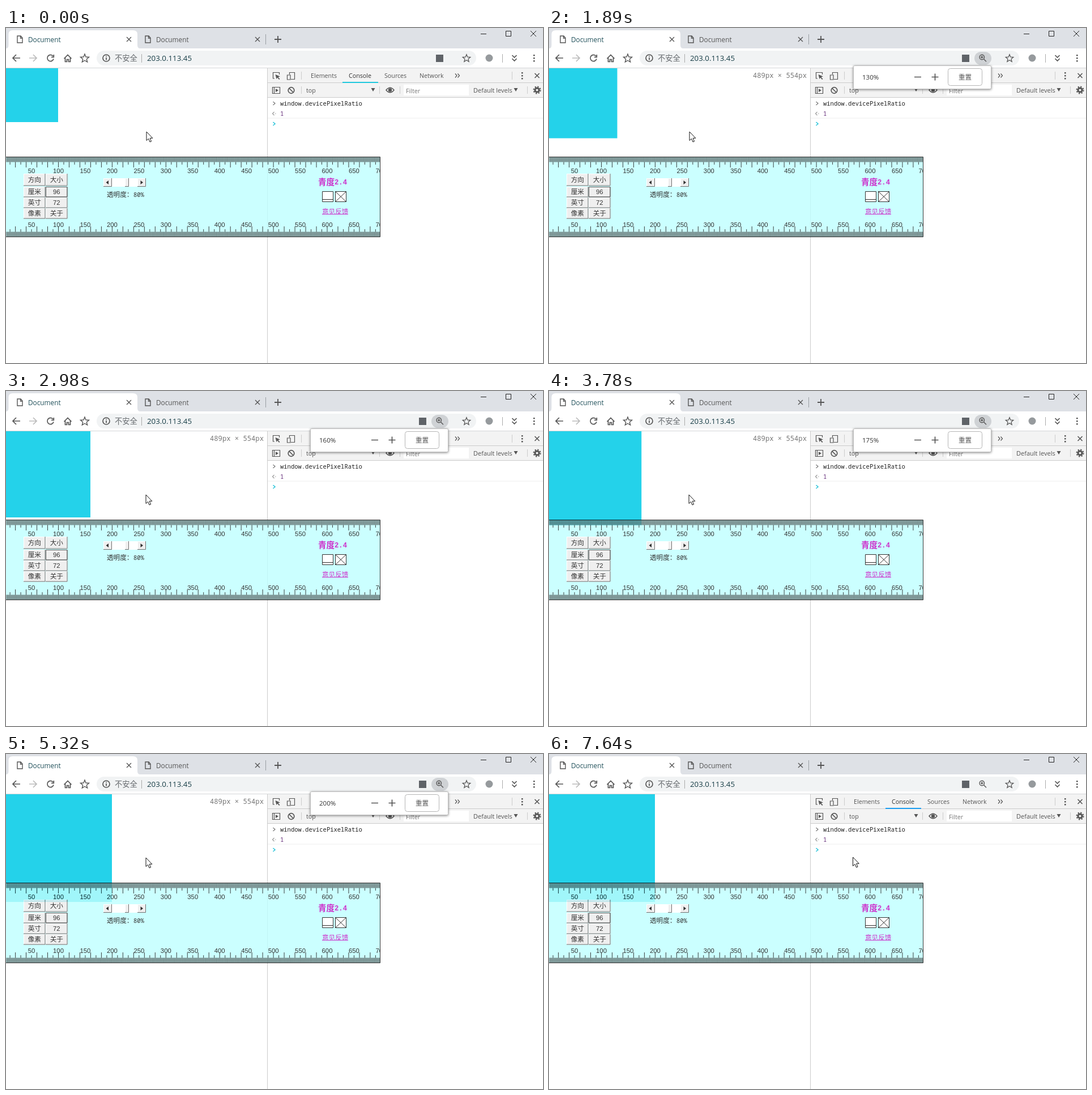
Recreate the animation shown at these times as an HTML page. Size 948 by 591 pixels, loop 8000 ms.

```html
<!DOCTYPE html>
<html lang="zh-CN">
<head>
<meta charset="utf-8">
<title>Zoom and ruler</title>
<style>
html, body { margin: 0; width: 100%; height: 100%; overflow: hidden; background: #fff; }
svg { display: block; }
text { font: 10.7px "Open Sans", "Noto Sans CJK SC", sans-serif; fill: #555; white-space: pre; }
.tab { font-size: 11.8px; }
.cjk { font: 11.6px "Noto Sans CJK SC", "Noto Sans CJK", sans-serif; fill: #000; }
.num { font: 11.3px "Liberation Sans", sans-serif; fill: #000; }
.code { font: 10.5px "Noto Sans Mono", monospace; fill: #222; }
.mid { text-anchor: middle; }
.line { fill: none; stroke: #555; stroke-width: 1.4; }
.bar { stroke: #ccc; fill: none; }
#popup, #zoomBg { transform-box: fill-box; transform-origin: center; }
#popup > rect:first-child { filter: drop-shadow(0 1px 2px #0007); }
</style>
</head>
<body>
<svg width="948" height="591" viewBox="0 0 948 591">
  <!-- tab strip -->
  <path fill="#dee1e6" d="M0 0H948V36H0Z"/>
  <path fill="#fff" d="M0 36Q4.500 36 4.500 30V11Q4.500 4 12 4H224Q232 4 232 11V30Q232 36 237 36V70H0Z"/>
  <path fill="#fff" d="M0 36H948V70H0Z"/>
  <g class="line" stroke-width="1.2">
    <path id="page" d="M20 14H26L29 17.500V26H20ZM25.500 14V18H29"/>
    <use href="#page" x="226"/>
    <path id="tabX" d="M213 16L221 24M221 16L213 24"/>
    <use href="#tabX" x="227"/>
    <path d="M474 20H486M480 14V26" stroke-width="1.8"/>
  </g>
  <path stroke="#999da3" d="M458.500 11V29"/>
  <text class="tab" x="39" y="24.500" style="fill:#20505a">Document</text>
  <text class="tab" x="265" y="24.500">Document</text>
  <path fill="none" stroke="#222" d="M838 10.500H848M882.500 5.500H891.500V14.500H882.500ZM926 5L936 15M936 5L926 15"/>

  <!-- address bar -->
  <rect x="160" y="40" width="670" height="26" rx="13" fill="#f1f3f4"/>
  <g class="line" style="stroke-width:1.7">
    <path d="M25 53H12M18 47L12 53L18 59"/>
    <path stroke="#bbb" d="M41 53H54M48 47L54 53L48 59"/>
    <path d="M83 49.500A5.600 5.600 0 1 0 84 54.500M84.300 47V51.300H80"/>
    <path d="M102.500 54L109 47.500L115.500 54M104.500 52.500V59.500H107.500V55.500H110.500V59.500H113.500V52.500"/>
    <path id="star" style="stroke-width:1.4" d="M139 46L141 51L146.500 51.400L142.300 55L143.600 60L139 57.200L134.400 60L135.700 55L131.500 51.400L137 51Z"/>
    <use href="#star" transform="translate(687.900 5.300) scale(.9)"/>
    <circle cx="177" cy="53" r="6"/>
    <path d="M177 52V56.500M177 49V50.500"/>
    <path d="M893.500 48L897.500 52L901.500 48M893.500 54L897.500 58L901.500 54"/>
  </g>
  <text class="cjk" x="192" y="58" style="font-size:13.300px;fill:#666a6e">不安全</text>
  <path stroke="#aaa" d="M239.500 46V61M876.500 46V61"/>
  <text x="249" y="57.500" style="font-size:13.300px;fill:#173d46">203.0.113.45</text>
  <rect id="translate" y="47" width="13" height="13" fill="#5f6368"/>
  <g id="zoomIcon">
    <rect id="zoomBg" x="751" y="42" width="30" height="23" rx="11.500" fill="#cfd2d5"/>
    <path class="line" d="M768.500 51.500A4.200 4.200 0 1 1 760.100 51.500A4.200 4.200 0 1 1 768.500 51.500M767.500 54.700L772 59.200M762 51.500H766.600M764.300 49.200V53.800"/>
  </g>
  <circle cx="853" cy="53" r="6.500" fill="#969a9d"/>
  <path id="dots" fill="#555" d="M931 47h2.500v2.500h-2.500zM931 52h2.500v2.500h-2.500zM931 57h2.500v2.500h-2.500z"/>
  <path stroke="#d4d6d8" d="M0 70.500H948"/>

  <!-- page -->
  <rect id="box" y="71" fill="#24d2ea"/>
  <text id="size" class="code" x="360" y="88" style="font-size:12.180px;fill:#777">489px × 554px</text>

  <!-- developer tools -->
  <path fill="#fff" d="M461 71H948V591H461Z"/>
  <path fill="#f3f3f3" d="M462 71H948V122H462Z"/>
  <path class="bar" d="M461.500 71V591M462 96.500H948M462 122.500H948M521.500 77V91M893.500 77V91M521.500 103V116M659.500 103V116M695.500 103V116M920.500 103V116"/>
  <path stroke="#eee" d="M462 159H948"/>
  <use href="#dots" x="-21" y="31"/>
  <g class="line" style="stroke-width:1.200">
    <path d="M474 89H471.500V78.500H482.500V82"/>
    <path fill="#555" d="M475.500 82L484 85.500L480.500 86.500L483.500 90L482 91L479.300 87.500L477.500 90Z" stroke="none"/>
    <path d="M500.500 82V78.500H509.500V90.500H503M496.500 83H502V91H496.500Z"/>
    <path d="M933.500 80L941.500 88M941.500 80L933.500 88" style="stroke-width:1.600"/>
    <path d="M470.500 104.500H483.500V115.500H470.500ZM473.500 105V115"/>
    <path fill="#555" stroke="none" d="M476 107L481 110L476 113Z"/>
    <circle cx="503.500" cy="110" r="5.300" style="stroke-width:1.700"/>
    <path d="M500 106.500L507 113.500" style="stroke-width:1.700"/>
    <path d="M671 109.500Q678 101 685 109.500Q678 118 671 109.500Z" style="stroke-width:1.500"/>
    <circle cx="678" cy="109.500" r="2.600" fill="#555"/>
    <circle cx="937.500" cy="109.500" r="3.600" style="stroke-width:3"/>
    <circle cx="937.500" cy="109.500" r="6" style="stroke-width:2;stroke-dasharray:2.350"/>
    <path d="M793 80.500L796 84L793 87.500M797.500 80.500L800.500 84L797.500 87.500"/>
    <path d="M471.500 130L475 133L471.500 136" stroke="#777"/>
    <path d="M473.500 148L470.500 151L473.500 154M475 151H476.500" stroke="#999"/>
    <path d="M471.500 166L475 169L471.500 172" stroke="#27c3da" style="stroke-width:1.500"/>
  </g>
  <text x="538" y="88">Elements</text>
  <text x="605" y="88" style="fill:#333">Console</text>
  <text x="668" y="88">Sources</text>
  <text x="730" y="88">Network</text>
  <path id="underline" d="M594 96H657" stroke-width="2"/>
  <text x="530" y="114">top</text>
  <path fill="#555" d="M644.500 106H651.500L648 112ZM896.500 106H903.500L900 112Z"/>
  <rect x="702" y="100" width="115" height="19" fill="#fff"/>
  <text x="706" y="114.500" style="fill:#777">Filter</text>
  <text x="825" y="113.500" style="font-size:11px">Default levels</text>
  <text class="code" x="484" y="136.500">window.devicePixelRatio</text>
  <text class="code" x="484" y="155" style="fill:#67307c">1</text>
  <path id="caret" stroke="#333" d="M484.500 162V176"/>

  <!-- zoom bubble -->
  <g id="popup">
    <rect x="537.500" y="66.500" width="243" height="41" rx="2" fill="#fff" stroke="#bbb"/>
    <text id="percent" x="553" y="91" style="font-size:11.500px;fill:#333"></text>
    <path class="line" d="M645 86.500H657M675.500 86.500H687.500M681.500 80.500V92.500" style="stroke-width:1.700"/>
    <rect x="704.500" y="71.500" width="60" height="30" rx="4" fill="#fff" stroke="#b5b5b5"/>
    <text class="cjk mid" x="734.500" y="91" style="fill:#555">重置</text>
  </g>

  <!-- translucent ruler window -->
  <svg y="227" width="661" height="142" viewBox="0 227 661 142" opacity=".8">
    <path fill="#bfffff" d="M0 227H661V369H0Z"/>
    <path id="ticks" stroke="#000" stroke-width=".95"/>
    <path stroke="#000" fill="none" d="M0 227.500H660.500V368.500H0"/>
    <path fill="#fff" d="M187 265H232V280H187Z"/>
    <g id="ruler"></g>
    <path fill="#000" d="M181 269V276L176.500 272.500ZM237.500 269V276L242 272.500Z"/>
    <text class="cjk" x="178" y="298">透明度：</text>
    <text class="code" x="225" y="298" style="fill:#000">80%</text>
    <text class="cjk" x="551" y="276.500" style="font-size:14.600px;font-weight:bold;fill:#c000c0">青度</text>
    <text x="580" y="276" style="font:bold 12.200px 'Liberation Mono',monospace;fill:#c000c0">2.4</text>
    <path fill="#fff" stroke="#000" d="M558.500 288.500H577.500V306.500H558.500ZM558.500 302.500H577.500M581.500 288.500H600.500V306.500H581.500ZL600.500 306.500M600.500 288.500L581.500 306.500"/>
    <text class="cjk" x="558" y="327.500" style="fill:#c000c0">意见反馈</text>
    <path stroke="#c000c0" d="M558 328.500H604"/>
  </svg>

  <path id="cursor" fill="#fff" stroke="#111" d="M0 0V15.500L3.600 12.300L6 18L8.500 17L6.200 11.300H10.800Z"/>
</svg>
<script>
const $ = id => document.getElementById(id);
const LOOP = 8000;

// [start ms, values...]
const zooms = [[0, 100], [1400, 115], [1570, 120], [1720, 125], [1890, 130], [2050, 135],
  [2210, 145], [2810, 150], [2980, 160], [3270, 165], [3420, 170], [3780, 175],
  [4220, 180], [4370, 185], [5010, 190], [5320, 200]];
const moves = [[0, 248, 183], [2980, 247, 183], [6580, 509, 181], [6730, 522, 181],
  [6880, 536.5, 181], [7490, 536.5, 182]];
const bubble = [[0, 0, 1], [1400, .5, .967], [1570, 1, 1], [6880, .6, .985], [7350, 0, 1]];
const at = (list, t) => list.findLast(step => step[0] <= t).slice(1);

function buildRuler() {
  let ticks = '', parts = '';
  for (let u = 4; u <= 700; u += 2) {
    const x = (u * .949 - 2.4).toFixed(2);
    const len = u % 20 == 0 ? 18 : u % 10 == 0 ? 13 : 8.5;
    ticks += `M${x} 228v${len}M${x} 368v${-len}`;
    if (u % 50 == 0) for (const y of [256, 351])
      parts += `<text class="num mid" x="${x}" y="${y}">${u}</text>`;
  }
  const button = (x, y, w, h, label = '', focus) => {
    const r = x + w, b = y + h;
    parts += `<path fill="#ececec" d="M${x} ${y}h${w}v${h}h${-w}z"/>
      <path fill="none" stroke="#fff" d="M${x + .5} ${b}V${y + .5}H${r}"/>
      <path fill="none" stroke="#4c4c4c" d="M${x} ${b - .5}H${r - .5}V${y}"/>
      ${focus ? `<path fill="none" stroke="#333" d="M${x + .5} ${y + .5}h${w - 1}v${h - 1}h${1 - w}z"/>` : ''}
      <text class="${label > 0 ? 'num' : 'cjk'} mid" x="${x + w / 2}" y="${y + h / 2 + 4.2}">${label}</text>`;
  };
  const rows = [['方向', '大小'], ['厘米', '96'], ['英寸', '72'], ['像素', '关于']];
  rows.forEach((row, i) => row.forEach((label, j) =>
    button(31 + j * 39, i ? 261 + i * 19 : 257, 38.5, i ? 18.5 : 21.5, label, label == '96')));
  button(172, 265, 15, 15);
  button(210, 265, 7, 15);
  button(232, 265, 15, 15);
  $('ticks').setAttribute('d', ticks);
  $('ruler').innerHTML = parts;
}

const show = (id, on) => $(id).setAttribute('visibility', on ? 'visible' : 'hidden');

function draw(now) {
  const t = now % LOOP;
  const [zoom] = at(zooms, t), [x, y] = at(moves, t), [alpha, scale] = at(bubble, t);
  const zoomed = t >= 1400, opening = zoomed && t < 1570;
  $('box').setAttribute('width', .95 * zoom - 3);
  $('box').setAttribute('height', .95 * zoom);
  $('percent').textContent = zoom + '%';
  $('cursor').setAttribute('transform', `translate(${x} ${y})`);
  $('popup').style.opacity = alpha;
  $('popup').style.transform = `scale(${scale})`;
  $('translate').setAttribute('x', zoomed ? 729 : 759);
  $('zoomBg').style.opacity = opening ? .5 : alpha ? 1 : 0;
  $('zoomBg').style.transform = `scale(${opening ? .7 : 1})`;
  $('underline').setAttribute('stroke', t < 7350 ? '#1fc8dd' : '#1a9cf0');
  show('zoomIcon', zoomed);
  show('size', zoomed && t < 6440);
  show('caret', t >= 7350 && t < 7640);
}

buildRuler();
const start = performance.now();
function frame() {
  draw(performance.now() - start);
  requestAnimationFrame(frame);
}
frame();
</script>
</body>
</html>
```
